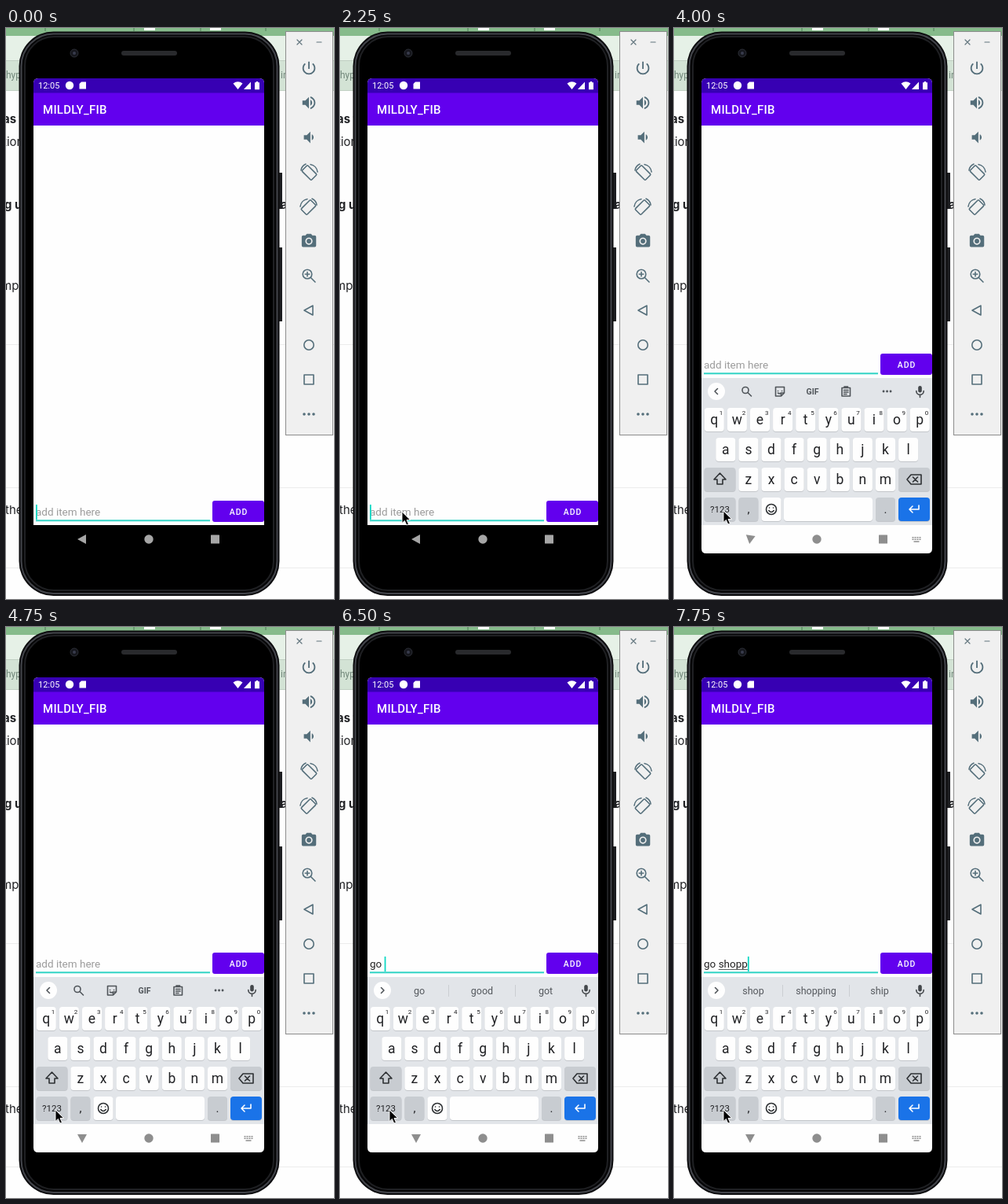
Animation of 418 by 726 pixels, one loop 8000 ms. Source, as an HTML page:

```html
<!DOCTYPE html>
<html lang="en">
<head>
<meta charset="utf-8">
<title>Typing in a list app</title>
<style>
html, body { margin: 0; width: 100%; height: 100%; overflow: hidden; background: #fefefe; }
svg { display: block; width: 418px; height: 726px; font-family: Roboto, sans-serif; }
text { white-space: pre; }
.line { fill: none; stroke-width: 1.6; stroke-linejoin: round; stroke-linecap: round; }
.mid { text-anchor: middle; }
</style>
</head>
<body>
<svg viewBox="0 0 418 726">
  <!-- page behind the phone -->
  <rect width="418" height="726" fill="#fefefe"/>
  <rect width="418" height="10" fill="#86bb8b"/>
  <path d="M50 0v4M163 0v4M248 0v4M331 0v4" stroke="#4f7a56"/>
  <path d="M176 0h14v3h-14zM260 0h14v3h-14z" fill="#fff"/>
  <rect y="10" width="418" height="31" fill="#e6f1e7"/>
  <rect y="41" width="418" height="38" fill="#d3e3d5"/>
  <path d="M0 41.5H418M0 79.5H418" stroke="#c0cfc2"/>
  <path d="M0 402.5H418M0 584.5H418M0 686.5H418" stroke="#ececec"/>
  <g font-size="12" fill="#71877a"><text x="0" y="64">hyp</text><text x="350" y="64">in</text></g>
  <g font-size="15" fill="#202124" font-family="Inter, sans-serif">
    <text x="-4" y="121" font-weight="700">as t</text>
    <text x="-4" y="150">tion</text>
    <text x="-2" y="230" font-weight="700">g u</text>
    <text x="350" y="230" font-weight="700">a</text>
    <text x="-6" y="333">mp</text>
    <text x="-1" y="618">the</text>
  </g>

  <!-- emulator side panel -->
  <rect x="356.5" y="4.5" width="60" height="513" fill="#f0f0f0" stroke="#8c8c8c"/>
  <path d="M371 15l6 6m0-6l-6 6M396 18h6" stroke="#60747d" class="line" style="stroke-width:1.2"/>
  <g id="side" fill="#546e7a"></g>
  <g class="line" stroke="#546e7a">
    <g id="turn"><rect x="-5.2" y="-8.5" width="10.4" height="17" rx="1.3" transform="translate(386.5 184) rotate(-45)"/>
      <path d="M376 181a10 10 0 0 1 6-8M388 173.500a11 11 0 0 1 9 9.500"/></g>
    <use href="#turn" transform="translate(772 44) scale(-1 1)"/>
    <circle cx="384" cy="313" r="5.8"/><path d="M388.5 317.500l5.500 5.500M381.200 313h5.600M384 310.200v5.600"/>
    <path d="M380 359l11-6v12z"/><circle cx="386" cy="403" r="6.200"/><rect x="380" y="441" width="12" height="12"/>
  </g>
  <path d="M380 491h.01M386 491h.01M392 491h.01" stroke="#546e7a" stroke-width="3.6" stroke-linecap="round"/>

  <!-- phone body -->
  <path d="M347 184h5v46h-5zM347 279h5v94h-5z" fill="#1d1e21"/>
  <rect x="16.500" y="4.500" width="332" height="717.500" rx="44" fill="#0c0c0e"/>
  <rect x="19.500" y="7.500" width="326" height="711.500" rx="41" fill="#060607" stroke="#43454b" stroke-width="2"/>
  <rect x="24" y="11" width="317" height="704" rx="37" fill="#000" stroke="#1f2023" stroke-width="2"/>
  <circle cx="87" cy="32" r="5" fill="#15161c" stroke="#2c2e36"/>
  <circle cx="87" cy="32" r="2" fill="#383c4c"/>
  <rect x="147" y="29" width="71" height="6" rx="3" fill="#292a2d"/>

  <!-- app -->
  <path d="M35 632V70q0-6 6-6H323q6 0 6 6V632z" fill="#fefefe"/>
  <path d="M35 124V82H329V124z" fill="#6200ee"/>
  <path d="M35 82.500V70q0-6 6-6H323q6 0 6 6V82.500z" fill="#3700b3"/>
  <g fill="#fff">
    <text x="41" y="77" font-size="11">12:05</text>
    <circle cx="81" cy="73" r="5.200"/>
    <path d="M96 68.500h6v9h-8.500v-6.500z"/>
    <path d="M289.500 70.500q6-4.500 12 0l-6 7.500zM303 78l9-9.500v9.500zM317 69.200h1.800v-1.200h2.400v1.200h1.800v9h-6z"/>
    <text x="47" y="109" font-size="15" font-weight="500" letter-spacing=".25">MILDLY_FIB</text>
  </g>

  <g id="entry">
    <text id="hint" x="38" y="620" font-size="13.500" fill="#9c9c9c">add item here</text>
    <text id="typed" x="38" y="620" font-size="13.500" fill="#212121"></text>
    <path id="under" fill="none" stroke="#606060"/>
    <rect x="38" y="625.300" width="222" height="2" fill="#2fd3c5"/>
    <rect id="caret" y="606" width="1.800" height="19" fill="#10d8c4"/>
    <rect x="263" y="601" width="66" height="27" rx="3" fill="#6200ee"/>
    <text x="296.500" y="618.600" class="mid" font-size="10.500" font-weight="500" letter-spacing="1" fill="#fff">ADD</text>
  </g>

  <!-- keyboard -->
  <g id="board">
    <path d="M35 632V445H329V632z" fill="#e2e5e9"/>
    <path d="M35 632H329V662q0 6-6 6H41q-6 0-6-6z" fill="#fefefe"/>
    <g id="keys"></g>
    <circle cx="54" cy="462" r="11" fill="#fefefe"/>
    <path id="chevron" class="line" stroke="#50555a"/>
    <g id="tools" fill="#50555a">
      <g class="line" stroke="#50555a">
        <circle cx="91" cy="460.500" r="4"/><path d="M94 463.500l4.500 4.500"/>
        <path d="M129.500 456.500h11v7.500l-4 4h-7zM140.500 464h-4v4M132.500 461.500h.1M137.500 461.500h.1M132.500 464q2 1.500 4 0"/>
        <path d="M214 457.500h10.500v10.500H214zM216.500 460.500h5.500M216.500 463h5.500M216.500 465.500h3.500M217 457.500v-1.500h4.500v1.500"/>
        <path d="M267 462h.1M271.500 462h.1M276 462h.1" style="stroke-width:2.8"/>
      </g>
      <text x="176.500" y="466" class="mid" font-size="10.500" font-weight="700">GIF</text>
    </g>
    <g id="words" fill="#54585d" font-size="12.500" class="mid">
      <path d="M138.500 455v15M223.500 455v15" stroke="#cbced2"/>
      <text x="101" y="467"></text><text x="181" y="467"></text><text x="262" y="467"></text>
    </g>
    <rect x="311.200" y="455" width="4.600" height="8.500" rx="2.300" fill="#43474b"/>
    <path d="M308.800 461.500a4.700 4.700 0 0 0 9.400 0M313.500 466.500v3" class="line" stroke="#43474b"/>
  </g>

  <g id="nav">
    <path id="back" d="M91 650l11-6v12z"/>
    <circle cx="182" cy="650" r="5.700"/>
    <rect x="261" y="644.500" width="11" height="11" rx=".5"/>
    <path id="kbIcon" d="M303.500 647h2v1.500h-2zM306.500 647h2v1.500h-2zM309.500 647h2v1.500h-2zM312.500 647h2v1.500h-2zM303.500 649.500h2v1.500h-2zM306.500 649.500h2v1.500h-2zM309.500 649.500h2v1.500h-2zM312.500 649.500h2v1.500h-2zM305.500 652.200h7v1.500h-7z"/>
  </g>
  <path id="mouse" d="M0 0V14.500L3.400 11.400L5.800 17L8.400 15.900L6 10.500H10.600z" fill="#000" stroke="#fff" stroke-width=".9"/>
</svg>
<script>
const $ = id => document.getElementById(id);
const LOOP = 8000, STEP = 250, LIFT = -187;

const icons = [
  [51, "M13 3h-2v10h2V3zm4.830 2.170l-1.420 1.420C17.990 7.860 19 9.810 19 12c0 3.870-3.130 7-7 7s-7-3.130-7-7c0-2.190 1.010-4.140 2.580-5.420L6.170 5.170C4.230 6.820 3 9.260 3 12c0 4.970 4.030 9 9 9s9-4.030 9-9c0-2.740-1.230-5.180-3.170-6.830z"],
  [95, "M3 9v6h4l5 5V4L7 9zM16.500 12c0-1.770-1-3.290-2.500-4v8c1.500-.7 2.500-2.230 2.500-4zM14 3.200v2.100c2.900.9 5 3.500 5 6.700s-2.100 5.800-5 6.700v2.100c4-.9 7-4.500 7-8.800s-3-7.900-7-8.800z"],
  [139, "M18.500 12c0-1.770-1-3.290-2.500-4v8c1.500-.7 2.500-2.230 2.500-4zM5 9v6h4l5 5V4L9 9z"],
  [271, "M9 2L7.200 4H4a2 2 0 0 0-2 2v12a2 2 0 0 0 2 2h16a2 2 0 0 0 2-2V6a2 2 0 0 0-2-2h-3.200L15 2zM12 17a5 5 0 1 1 0-10 5 5 0 0 1 0 10zM12 15.200a3.200 3.200 0 1 0 0-6.400 3.200 3.200 0 0 0 0 6.400z"]
];
$("side").innerHTML = icons.map(([y, d]) =>
  `<path fill-rule="evenodd" transform="translate(375 ${y - 11}) scale(.92)" d="${d}"/>`).join("");

const WHITE = "#fefefe", GREY = "#c8ccd1", INK = "#2d3033";
const key = (x, y, w, fill, label = "", size = 17.5) =>
  `<rect x="${x}" y="${y + 1}" width="${w}" height="30" rx="4" fill="#c3c6ca"/>` +
  `<rect x="${x}" y="${y}" width="${w}" height="30" rx="4" fill="${fill}"/>` +
  `<text class="mid" x="${x + w / 2}" y="${y + 15 + size * .34}" font-size="${size}">${label}</text>`;
const row = (chars, x, y) => [...chars].map((c, i) => key(x + i * 29.1, y, 25, WHITE, c)).join("");
const glyph = (d, color) => `<path class="line" stroke="${color}" d="${d}"/>`;

$("keys").innerHTML = '<g fill="#202124">' +
  row("qwertyuiop", 38.8, 483) + row("asdfghjkl", 53.3, 521) + row("zxcvbnm", 82.4, 559) +
  [..."1234567890"].map((c, i) => `<text class="mid" x="${60 + i * 29.1}" y="492" font-size="8">${c}</text>`).join("") +
  key(38.5, 559, 40, GREY) + key(286, 559, 40, GREY) +
  key(38.5, 597, 40, GREY, "?123", 11.5) + key(82.4, 597, 25, GREY, ",", 15) +
  key(111.500, 597, 25, WHITE) + key(140, 597, 113, WHITE) +
  key(257, 597, 25, GREY, ".", 15) + key(286, 597, 40, "#1a73e8") + "</g>" +
  glyph("M58.500 566l-7.500 8h4v6h7v-6h4z", INK) +
  glyph("M302 568h13v12h-13l-5-6zM304.500 571l6 6m0-6l-6 6", INK) +
  glyph("M130.500 612a6.500 6.500 0 1 1-13 0a6.500 6.500 0 1 1 13 0M121.500 610h.1M126.500 610h.1M120.800 613.500q3.200 4 6.400 0", INK) +
  glyph("M312 607v5h-12m4-4l-4 4l4 4", "#fff");

// start time, text, suggestions
const typing = [
  [6000, "g", "go good get"],
  [6250, "go", "go good got"],
  [6500, "go ", "go good got"],
  [6750, "go s", "so shopping see"],
  [7000, "go sh", "she should shopping"],
  [7250, "go sho", "should shop show"],
  [7500, "go shop", "shop shopping shops"],
  [7750, "go shopp", "shop shopping ship"]
];

// time, x, y of the pointer tip
const path = [[250, 395, 643], [1250, 84, 604], [1500, 79, 600], [2250, 79, 615], [2500, 79, 615], [3250, 63, 614]];

function pointer(t) {
  const i = path.findIndex(p => p[0] > t);
  if (i < 0) return path[path.length - 1].slice(1);
  const [a, b] = [path[i - 1], path[i]];
  const u = (t - a[0]) / (b[0] - a[0]), e = u * (2 - u);
  return [a[1] + (b[1] - a[1]) * e, a[2] + (b[2] - a[2]) * e];
}

function caretOn(t) {
  if (t < 3250) return t % 1000 < 500;
  if (t < 4250) return false;
  return t >= 6000 || (t - 4250) % 1000 < 500;
}

const show = (el, on) => el.setAttribute("visibility", on ? "inherit" : "hidden");

function render(time) {
  const t = Math.floor((time % LOOP) / STEP) * STEP;
  const open = t >= 4000;
  const [, text, words] = typing.filter(s => s[0] <= t).pop() || [0, "", ""];

  show($("board"), open);
  $("entry").setAttribute("transform", `translate(0 ${open ? LIFT : 0})`);
  $("nav").setAttribute("fill", open ? "#8e8e8e" : "#a6a6a6");
  $("back").setAttribute("transform", `rotate(${!open ? 0 : t < 4250 ? -82 : -90} 97 650)`);
  show($("kbIcon"), t >= 3750);

  show($("hint"), !text);
  const typed = $("typed");
  typed.textContent = text;
  const end = 38 + (text ? typed.getComputedTextLength() : 0);
  $("caret").setAttribute("x", end);
  show($("caret"), caretOn(t));
  const from = text.length > 3 ? 38 + typed.getSubStringLength(0, 3) : 38;
  $("under").setAttribute("d", text && !text.endsWith(" ") ? `M${from} 622.500H${end}` : "");

  show($("tools"), !text);
  show($("words"), !!text);
  const list = words.split(" ");
  $("words").querySelectorAll("text").forEach((el, i) => { el.textContent = list[i] || ""; });
  $("chevron").setAttribute("d", text ? "M52.500 458.500l3.500 3.500l-3.500 3.500" : "M55.500 458.500l-3.500 3.500l3.500 3.500");

  show($("mouse"), t >= 250);
  if (t >= 250) $("mouse").setAttribute("transform", `translate(${pointer(t)})`);
}

const start = performance.now();
function tick() {
  render(performance.now() - start);
  requestAnimationFrame(tick);
}
tick();
</script>
</body>
</html>
```
